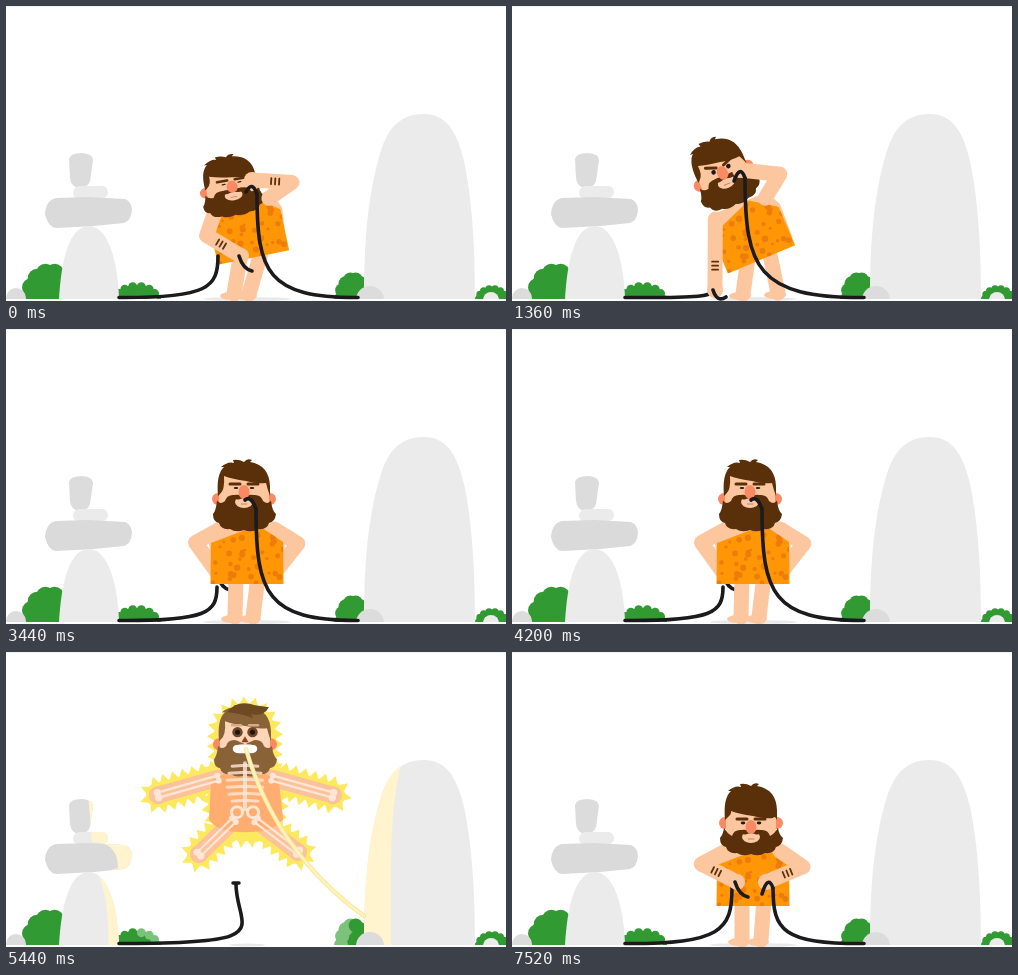
Recreate the animation shown at these times as an HTML page with a canvas. Size 500x295 px, loop 7.56 s.

```html
<!DOCTYPE html>
<html lang="en">
<head>
<meta charset="utf-8">
<title>Caveman and cables</title>
<style>
html, body { margin: 0; width: 100%; height: 100%; overflow: hidden; background: #fff; }
canvas { display: block; width: 500px; height: 295px; }
</style>
</head>
<body>
<canvas id="stage" width="500" height="295"></canvas>
<script>
const ctx = document.getElementById('stage').getContext('2d');
const LOOP = 7560, FLOOR = 293;
const SKIN = '#fcc69e', HAIR = '#593009', INK = '#1b1b1d', EAR = '#fa8a63';
const LIGHT = '#ebebeb', GREY = '#dcdcdc', GREEN = '#329a32';
const GLOW = '#fde95f', LIT = '#fff4cd', FLESH = '#fbc29c', BONE = '#ffe6d6';

const mix = (a, b, k) => Array.isArray(a) ? a.map((v, i) => mix(v, b[i], k)) : a + (b - a) * k;

// maps a point relative to a centre, turned by an angle in degrees
function place([cx, cy], angle, x, y) {
  const a = angle * Math.PI / 180;
  return [cx + x * Math.cos(a) - y * Math.sin(a), cy + x * Math.sin(a) + y * Math.cos(a)];
}

// two-bone limb, elbow always turned away from the body
function bend([sx, sy], [hx, hy], side, upper = 28, fore = 40) {
  const d = Math.hypot(hx - sx, hy - sy), dx = (hx - sx) / d, dy = (hy - sy) / d;
  const far = d >= upper + fore;
  const along = far ? d * .41 : (upper * upper - fore * fore + d * d) / (2 * d);
  const out = far ? 0 : Math.sqrt(upper * upper - along * along) * side * Math.sign(dy);
  return [sx, sy, sx + dx * along + dy * out, sy + dy * along - dx * out, hx, hy];
}

// hanging cable: drops straight, then runs out along the floor
function hang([x, y], end, slack) {
  return [x, y, x, mix(y, 292, .75), x + slack * (end - x), 292, end, 291.5];
}

function rig(s) {
  const p = { eye: 0, brow: 0, mouth: 0, slack: .1, hook: 0, hip: [11, 14], over: 0, sit: 0, shade: 44,
    back: [0, 0], band: [0, 0], lean: 0, ...s };
  const on = (x, y) => place(p.at, p.lean, x, y);
  p.arms = [-1, 1].map((side, i) => bend(on(27 * side, -33), p.hands[i], side));
  p.legs = [-1, 1].map((side, i) => [...on(p.hip[0] * side, p.hip[1]), ...p.feet[i]]);
  p.tunic = [on(-36, -19), on(11, -37), on(36, -20), on(36.5, 22), on(-36.5, 22)].flat();
  p.cords = [hang(p.plugs[0], 113, p.slack), hang(p.plugs[1], 352, .1)];
  return p;
}

const bite = rig({
  at: [243, 230], lean: -11.5, head: [225, 180, -10, .86], look: [1, 0],
  hands: [[235, 250], [246, 174]], feet: [[228, 288], [243, 288]],
  plugs: [[212, 250], [251, 188]], hook: -2, band: [1, 1], over: 1
});
const holding = {
  at: [241, 233], lean: -22.7, head: [210.5, 167, -22.7, 1], look: [0, -1], eye: 1, brow: 1,
  hands: [[203, 284], [228, 164]], feet: [[231, 288], [266, 287]],
  plugs: [[200, 284], [233, 172]], hook: 3, band: [1, 0], over: 1
};
const hold = rig(holding);
const chew = rig({
  ...holding, hands: [[203, 284], [250, 225]], plugs: [[200, 284], [231, 180]], hook: -8, back: [0, 1], over: 0
});
const proud = rig({
  at: [241, 233], head: [238, 167, 0, 1], look: [0, -5], eye: .1,
  hands: [[213, 246], [267, 246]], feet: [[229, 288], [247, 288]],
  plugs: [[211, 258], [250, 180]], hook: -9, back: [1, 1]
});
const shock = rig({
  at: [239, 165], head: [239, 100, 0, 1], look: [0, -5], eye: 1,
  hands: [[152, 154], [327, 154]], feet: [[193, 213], [292, 211]],
  plugs: [[230, 232], [240, 108]], slack: -.4, shade: 18
});
const dazed = rig({
  at: [240, 272], head: [239, 223, 0, 1], look: [0, -2], eye: 1, mouth: 1,
  hands: [[220, 273], [260, 273]], feet: [[214, 286], [266, 286]], hip: [8, -6],
  plugs: [[240, 291], [240, 291]], band: [1, 1], sit: 1, shade: 40
});
const ready = rig({
  at: [241, 232], head: [239, 168, 0, 1], look: [0, 6], eye: .4,
  hands: [[225, 230], [254, 230]], feet: [[230, 288], [249, 288]],
  plugs: [[220, 236], [261, 236]], hook: 6, band: [1, 1]
});

// start, end, from, to, head hop
const MOVES = [
  [560, 880, bite, hold, 0], [1880, 2200, hold, chew, 0], [3080, 3360, chew, proud, 7],
  [4600, 4600, proud, shock, 0], [5520, 5800, shock, dazed, 0], [6540, 6900, dazed, ready, 0]
];
const isShock = t => t >= 4600 && t < 5520;

function poseAt(t) {
  let pose = bite;
  for (const [start, end, from, to, hop] of MOVES) {
    if (t < start) break;
    if (t >= end) { pose = to; continue; }
    const u = (t - start) / (end - start);
    const k = from === shock ? u * u : u * u * (3 - 2 * u);
    pose = {};
    for (const key in from) pose[key] = mix(from[key], to[key], k);
    pose.head[1] -= hop * Math.sin(Math.PI * u);
  }
  return pose;
}

function fill(d, color) { ctx.fillStyle = color; ctx.fill(new Path2D(d)); }
function disc(x, y, rx, color, ry = rx) {
  ctx.fillStyle = color;
  ctx.beginPath();
  ctx.ellipse(x, y, rx, ry, 0, 0, 7);
  ctx.fill();
}
function trace(p) {
  ctx.beginPath();
  for (let i = 0; i < p.length; i += 2) ctx.lineTo(p[i], p[i + 1]);
}
function line(p, w, color) {
  ctx.strokeStyle = color;
  ctx.lineWidth = w;
  trace(p);
  ctx.stroke();
}
function curve(x, y, bx, by, ex, ey, w, color) {
  ctx.strokeStyle = color;
  ctx.lineWidth = w;
  ctx.beginPath();
  ctx.moveTo(x, y);
  ctx.quadraticCurveTo(bx, by, ex, ey);
  ctx.stroke();
}

const STONES = [
  ['M63 153Q64 147 76 147Q87 148 87 154L84 175Q82 182 73 182Q65 181 64 172Z', GREY],
  ['M73 180H97Q102 181 102 187Q101 192 96 192H72Q67 192 67 186Q68 181 73 180Z', LIGHT],
  ['M50 192L82 191L119 193Q126 196 126 204Q125 215 118 217L88 220L50 222Q42 221 39 208Q40 194 50 192Z', '#dadada'],
  ['M53 293C55 258 62 220 83 220C104 221 112 260 113 293Z', LIGHT],
  ['M358 293C358 235 362 188 374 148C382 120 396 108 418 108C440 108 451 125 458 155C466 192 469 240 469 293Z', LIGHT]
];

// half ellipse edged with round lobes; the side facing the flash can be lit
function bush(x, rx, ry, litSide) {
  const r = ry * .26;
  disc(x, FLOOR, rx - r * .6, GREEN, ry - r * .6);
  for (let i = 0; i < 8; i++) {
    const a = Math.PI * (i / 7), c = -Math.cos(a);
    disc(x + c * (rx - r), FLOOR - Math.sin(a) * (ry - r), r, c * litSide > .2 ? '#7cc27c' : GREEN);
  }
}

function scene(lit, n) {
  ctx.fillStyle = '#fff';
  ctx.fillRect(0, 0, 500, 295);
  ctx.fillStyle = '#f1f1f1';
  ctx.fillRect(0, 0, 500, 1);
  ctx.save();
  ctx.beginPath();
  ctx.rect(0, 0, 500, FLOOR);
  ctx.clip();
  bush(44, 30, 36, 0);
  bush(131, 24, 17, lit ? 1 : 0);
  bush(347, 19, 27, lit ? -1 : 0);
  bush(486, 17, 14, 0);
  for (const [d, color] of STONES) {
    fill(d, color);
    if (!lit) continue;
    ctx.save();
    ctx.clip(new Path2D(d));
    const w = n % 2 * 2;
    fill(`M350 100H${400 + w}Q386 130 ${385 + w} 210V293H350Z`, LIT);
    fill(`M${82 - w} 140L${86 - w} 190Q${112 - w} 190 ${112 - w} 216L${92 - w} 222Q${104 - w} 250 ${102 - w} 293H140V140Z`, LIT);
    ctx.restore();
  }
  disc(10, 292, 10, GREY);
  disc(147, 294, 4, LIGHT);
  disc(364, 294, 14, GREY);
  disc(485, 294, 8, LIGHT);
  ctx.restore();
}

function cord(c) {
  ctx.strokeStyle = INK;
  ctx.lineWidth = 3.6;
  ctx.beginPath();
  ctx.moveTo(c[0], c[1]);
  ctx.bezierCurveTo(...c.slice(2));
  ctx.stroke();
}
function leftTip([x, y]) {
  curve(x - 2, y, x + 2, y + 13, x + 11, Math.min(y + 15, 291), 3.6, INK);
}
function rightCord(p) {
  const [x, y] = p.plugs[1];
  curve(x - 11, y + p.hook, x - 5, y - 14, x, y, 3.6, INK);
  cord(p.cords[1]);
}

function arm(p, band) {
  line(p, 15, SKIN);
  const [, , ex, ey, hx, hy] = p;
  disc(hx, hy, 8, SKIN);
  if (band < .5) return;
  const len = Math.hypot(hx - ex, hy - ey), dx = (hx - ex) / len, dy = (hy - ey) / len;
  for (let i = -1; i < 2; i++) {
    const x = ex + dx * (len * .42 + i * 4), y = ey + dy * (len * .42 + i * 4);
    line([x - dy * 3, y + dx * 3, x + dy * 3, y - dx * 3], 1.8, HAIR);
  }
}
function leg(p) {
  line(p, 15, SKIN);
  disc(p[2] - 3, Math.min(p[3] + 2, 290), 11, SKIN, 4);
}

let seed = 11;
const rnd = () => (seed = seed * 16807 % 2147483647) / 2147483647;
const SPOTS = Array.from({ length: 42 }, (_, i) => [
  (i % 7 + rnd()) * 10.6 - 37, ((i / 7 | 0) + rnd()) * 10 - 38, 1.4 + rnd() * 2
]);
function tunic(p) {
  trace(p.tunic);
  ctx.fillStyle = '#ff9606';
  ctx.fill();
  ctx.save();
  ctx.clip();
  for (const [x, y, r] of SPOTS) disc(...place(p.at, p.lean, x, y), r, '#ee7c0a');
  ctx.restore();
}

function head(p, bones) {
  const [x, y, angle, squash] = p.head, [lx, ly] = p.look;
  const hair = bones ? '#8a6238' : HAIR;
  const fringe = ly - 14, lip = ly + 6;
  ctx.save();
  ctx.translate(x, y);
  ctx.rotate(angle * Math.PI / 180);
  ctx.scale(1, squash);
  for (const side of [-1, 1]) disc(side * 26, 3, 6, EAR);
  fill('M-25-18Q0-32 25-18V22H-25Z', bones ? '#fdd5b8' : SKIN);
  fill(`M-26 0Q-28-22-20-29L-23-29Q-16-35-10-33L-11-36Q-5-37 0-34Q3-38 8-36L6-34Q25-31 26-10V0Q24-5 22 ${fringe + 6}Q12 ${fringe + 7} 2 ${fringe + 4}Q-12 ${fringe + 2}-20 ${fringe - 1}Q-19-6-24-2Z`, hair);
  if (bones) fill('M-18-29Q-8-42 10-36L24-34Q18-24 6-27L8-23Q-4-28-18-29Z', '#6d4a22');
  fill(`M-27 ${6 + ly * .3}Q-24 ${11 + ly * .4} -19 ${lip + 4}Q-17 ${lip - 3} -9 ${lip - 2}L0 ${lip + 2}L9 ${lip - 2}Q17 ${lip - 3} 19 ${lip + 4}Q24 ${11 + ly * .4} 27 ${6 + ly * .3}Q28 15 32 18Q31 26 25 27Q23 34 14 33Q8 37 0 34Q-8 37-14 33Q-23 34-25 27Q-31 26-31 18Q-28 15-27 ${6 + ly * .3}Z`, hair);
  ctx.translate(lx, ly);
  if (bones) {
    for (const side of [-1, 1]) {
      disc(side * 7.5, -4, 5.2, '#6d4527');
      disc(side * 7.5, -4, 2.5, '#20150f');
      line([side * 4, -11, side * 13, -11], 2.5, '#d3ab88');
    }
    fill('M0 0L3.5 6H-3.5Z', '#9a3a22');
    fill('M-10 9Q0 7 10 9Q13 11 12 14Q10 18 0 17Q-10 18-12 14Q-13 11-10 9Z', '#fff');
  } else {
    disc(0, 11, 9, '#fbc9a5', 6);
    fill('M-12 5Q-6 2 0 6Q6 2 12 5Q8 10 4 8L0 7L-4 8Q-8 10-12 5Z', hair);
    if (p.mouth > .5) disc(0, 12, 2, HAIR);
    else line([-3, 13, 3, 13], 1, '#c9835c');
    for (const side of [-1, 1]) {
      disc(side * 8, -3, 2.3, INK, .8 + 1.5 * p.eye);
      line([side * 4, -7 + p.brow, side * 14, -7 - p.brow * 3], 3, HAIR);
    }
    disc(0, 1, 5.5, EAR, 7);
  }
  ctx.restore();
}

function body(p) {
  disc(241, 293, p.shade, '#e9e9e9', 2);
  const behind = p.back.map(v => v > .5), over = p.over > .5, sit = p.sit > .5;
  const legs = () => p.legs.forEach(leg);
  if (sit) p.cords.forEach(cord);
  if (behind[0]) {
    cord(p.cords[0]);
    leftTip(p.hands[0]);
  }
  p.arms.forEach((a, i) => behind[i] && arm(a, 0));
  if (!sit) legs();
  const [left, right] = p.arms, q = p.tunic;
  trace([left[0], left[1], right[0], right[1], q[4] - 3, q[5], q[6] - 8, q[7] - 8, q[8] + 8, q[9] - 8, q[0] + 3, q[1]]);
  ctx.fillStyle = ctx.strokeStyle = SKIN;
  ctx.lineWidth = 10;
  ctx.fill();
  ctx.stroke();
  tunic(p);
  if (sit) legs();
  if (!behind[0]) {
    if (!sit) cord(p.cords[0]);
    arm(left, p.band[0]);
    if (!sit) leftTip(p.hands[0]);
  }
  if (!behind[1] && !over) arm(right, p.band[1]);
  head(p, false);
  if (over) arm(right, p.band[1]);
  if (!sit) rightCord(p);
}

// capsule with a spiky rim
function spikes(x1, y1, x2, y2, r, phase) {
  line([x1, y1, x2, y2], r * 2, GLOW);
  const len = Math.hypot(x2 - x1, y2 - y1), a = Math.atan2(y2 - y1, x2 - x1);
  const half = len + Math.PI * r, count = Math.round(half / 5), step = 2 * half / count;
  const rim = (s, h) => {
    s = (s + 2 * half) % (2 * half);
    const far = s >= half;
    if (far) s -= half;
    const way = a + (far ? Math.PI : 0), along = Math.min(s, len);
    const out = way - Math.PI / 2 + (s - along) / r;
    return [(far ? x2 : x1) + Math.cos(way) * along + Math.cos(out) * (r + h),
      (far ? y2 : y1) + Math.sin(way) * along + Math.sin(out) * (r + h)];
  };
  ctx.fillStyle = GLOW;
  for (let i = 0; i < count; i++) {
    const s = (i + phase) * step;
    trace([...rim(s - 5, -1), ...rim(s, 7), ...rim(s + 5, -1)]);
    ctx.fill();
  }
}

function bone(x1, y1, x2, y2) {
  const len = Math.hypot(x2 - x1, y2 - y1);
  const nx = (y2 - y1) / len * 2.6, ny = -(x2 - x1) / len * 2.6;
  for (const s of [-1, 1]) {
    line([x1 + nx * s, y1 + ny * s, x2 + nx * s, y2 + ny * s], 2.2, BONE);
    disc(x1 + nx * s, y1 + ny * s, 3, BONE);
    disc(x2 + nx * s, y2 + ny * s, 3.6, BONE);
  }
}

function skeleton(p, t, n) {
  disc(241, 293, p.shade, '#e9e9e9', 1.5);
  cord(p.cords[0]);
  line([227, 231, 233, 231], 3.5, INK);
  const dy = [0, -3, 2][n % 3] - 13 * Math.max(0, (t - 5320) / 200);
  const limbs = [...p.arms.map(a => [a[0], a[1] + 5, a[4], a[5]]), ...p.legs];
  const phase = n % 2 / 2;
  ctx.save();
  ctx.translate(0, dy);
  spikes(239, 93, 239, 110, 31, phase);
  spikes(239, 145, 239, 163, 37, phase);
  for (const l of limbs) spikes(...l, 12, phase);
  for (const l of limbs) {
    line(l, 17, FLESH);
    disc(l[2], l[3], 9, FLESH);
  }
  fill('M205 140Q222 128 239 128Q256 128 273 140L277 178Q268 191 239 191Q210 191 203 178Z', '#ffad70');
  head(p, true);
  ctx.globalAlpha = .8;
  line([239, 122, 239, 168], 4, BONE);
  for (let i = 0; i < 6; i++) {
    const w = 9 + 9 * Math.sin((i + 1) / 7 * Math.PI), y = 124 + i * 7;
    line([239 - w, y + 1, 239, y, 239 + w, y + 1], 3, BONE);
  }
  ctx.globalAlpha = 1;
  ctx.strokeStyle = BONE;
  ctx.lineWidth = 3;
  for (const x of [231, 247]) {
    ctx.beginPath();
    ctx.arc(x, 171, 5.5, 0, 7);
    ctx.stroke();
  }
  limbs.forEach(l => bone(...l));
  ctx.restore();
  const [x, y] = p.plugs[1];
  curve(x, y + dy, 270, 200, 358, 264, 4.4, '#f8e493');
  curve(x, y + dy, 270, 200, 358, 264, 2.8, '#fff3bd');
}

function draw(t) {
  const n = Math.floor(t / 40), lit = isShock(t), pose = poseAt(t);
  ctx.lineCap = ctx.lineJoin = 'round';
  scene(lit, n);
  if (lit) skeleton(pose, t, n);
  else body(pose);
}

const began = performance.now();
function tick() {
  draw((performance.now() - began) % LOOP);
  requestAnimationFrame(tick);
}
tick();
</script>
</body>
</html>
```
